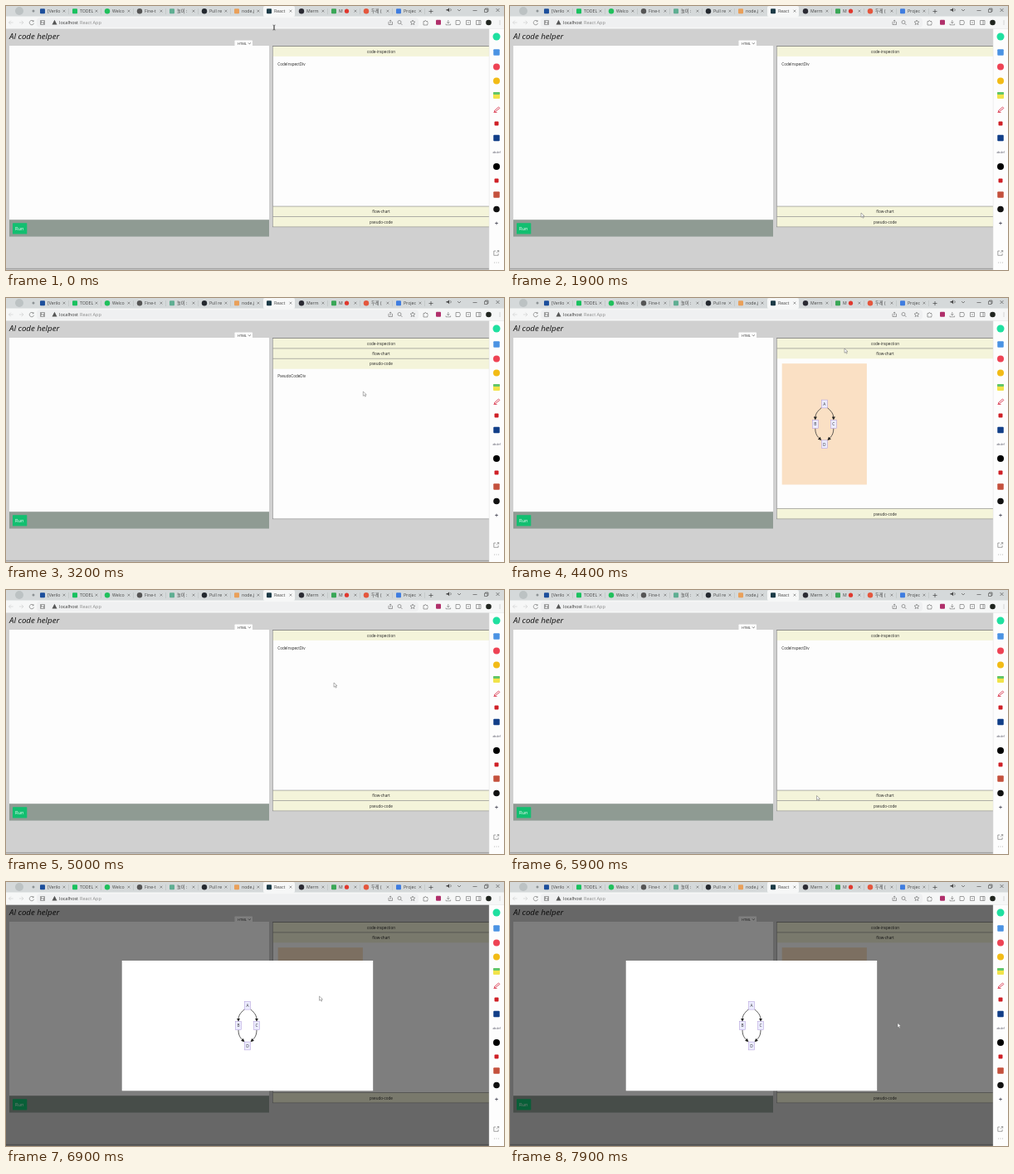
Animation, 600 px wide and 319 px high, one loop 8000 ms. Source, as an HTML page:

```html
<!DOCTYPE html>
<html lang="en">
<head>
<meta charset="utf-8">
<title>AI code helper</title>
<style>
html, body { margin: 0; width: 100%; height: 100%; overflow: hidden; background: #d0d0d0; }
svg { display: block; width: 100vw; height: 100vh; }
text { font-family: "Open Sans", "Noto Sans", "Noto Sans CJK KR", "Noto Sans CJK", sans-serif; white-space: pre; }
</style>
</head>
<body>
<svg id="stage" viewBox="0 0 600 319"></svg>
<script>
const LOOP = 8000;
const PAPER = '#fdfdfd';
const rect = (x, y, w, h, fill, more = '') =>
  `<rect x="${x}" y="${y}" width="${w}" height="${h}" fill="${fill}" ${more}/>`;
const dot = (x, y, r, fill) => `<circle cx="${x}" cy="${y}" r="${r}" fill="${fill}"/>`;
const line = (d, stroke = '#444', width = .8, more = '') =>
  `<path d="${d}" fill="none" stroke="${stroke}" stroke-width="${width}" ${more}/>`;
const text = (x, y, size, str, fill = '#222', more = '') =>
  `<text x="${x}" y="${y}" font-size="${size}" fill="${fill}" ${more}>${str}</text>`;
const square = (x, y, s, fill) => rect(x - s / 2, y - s / 2, s, s, fill, 'rx="1"');

// Browser chrome: tab title, icon colour, square icon or round
const tabs = [
  ['[Verilo', '#1d4f9c', 1], ['TODEL', '#19c15f', 1], ['Welco', '#20c05c', 0], ['Fine-t', '#555', 0],
  ['놀이 :', '#5fae92', 1], ['Pull re', '#24292f', 0], ['node.j', '#e9a05a', 1], ['React', '#1c3b47', 1],
  ['Merm', '#2b2b33', 0], ['M', '#3aa757', 1], ['두레 (', '#e4573d', 0], ['Projec', '#3f7de0', 1]
];

function tabStrip() {
  let out = rect(0, 0, 600, 13, '#d5d9da') + dot(16, 6, 5, '#bcc2c3') + dot(33, 6, 1.5, '#8c9294');
  tabs.forEach(([name, color, boxy], i) => {
    const x = 44 + i * 39;
    if (i === 7) out += rect(x - 7, 0, 38, 13, '#f6f7f7', 'rx="2"');
    else if (i !== 6) out += line(`M${x + 31.5} 3v7`, '#b4babb', .5);
    out += boxy ? square(x, 6.2, 6, color) : dot(x, 6.2, 3.2, color);
    out += text(x + 6, 8.1, 5.2, name, '#444');
    out += line(`M${x + 24.5} 4.700l2.800 2.800m0-2.800l-2.800 2.800`, '#666', .6);
  });
  return out + dot(410.5, 6.2, 2.6, '#e0382e') +
    line('M509.500 6.500h5m-2.500-2.500v5', '#444', .7) +
    '<path d="M530.5 4h1.600l2-1.800v5l-2-1.800h-1.600z" fill="#444"/>' +
    line('M535.500 3.200q1.500 1.500 0 3M544 4l2 2 2-2M562.500 5.500h5M576.500 4h3.500v3.500h-3.500zM577.500 4v-1h3.500v3.500h-1M590.500 3l4 4m0-4l-4 4', '#444', .6);
}

function toolbar() {
  const arrows =
    'M8.500 20h-5m2.300-2.300l-2.300 2.300 2.300 2.300M16 20h5m-2.300-2.300l2.300 2.300-2.300 2.300';
  const icons =
    'M33 18.300a2.700 2.700 0 1 0 .6 2.500m-.4-3.500v1.500h-1.500M41.500 17.500h5v5h-5zM42.500 21.500v-3l3 3v-3' +
    'M461 19v3.500h4.500v-3.500M463.200 21v-4m-1.300 1.300l1.300-1.300 1.300 1.300M475.500 21l2 2' +
    'M490 17l.9 1.900 2 .2-1.500 1.400.4 2-1.800-1-1.800 1 .4-2-1.500-1.400 2-.2z' +
    'M503 18.500h1.500q.7-2.500 1.600 0h1.700v1.500q1.500.7 0 1.500v1.500h-4.800z' +
    'M532.800 17v4m-1.600-1.600l1.600 1.600 1.600-1.600M530 21.500v1.300h5.600v-1.300' +
    'M542 17.500h4.500l1 2.500-1 2.500h-4.500zM554.500 17.500h5v5h-5zM556 20h2M566.500 17.500h5.500v5h-5.500zM570 17.500v5';
  return rect(0, 12.5, 600, 15, '#f6f7f7') +
    rect(37, 14.3, 460, 11.4, '#eff0f1', 'rx="4"') +
    line(arrows, '#ccc', .6) + line(icons, '#666', .6) +
    '<circle cx="474" cy="19.500" r="2" fill="none" stroke="#666" stroke-width=".6"/>' +
    '<path d="M58.500 16.700l3 5.800h-6z" fill="#555"/>' +
    text(64, 22, 5.5, 'localhost', '#333') + text(89, 22, 5.5, 'React App', '#888') +
    square(521, 19.8, 6, '#b0306b') + dot(581.5, 20, 3.3, '#20251f') +
    [18, 20, 22].map(y => dot(595, y, .4, '#666')).join('');
}

function sidebar() {
  const icons = [
    [37, '#1fe0a0', 0, 4.5], [56, '#4b93e3', 1, 7.5], [73.5, '#ee4354', 0, 4], [90.5, '#f2bb16', 0, 4],
    [142, '#cf2026', 1, 5], [159.5, '#123f88', 1, 7.5], [194, '#000', 0, 4], [211, '#cf2026', 1, 5],
    [228, '#c4513d', 1, 7.5], [245.5, '#111', 0, 3.8]
  ];
  return rect(582, 27.5, 18, 291.5, PAPER) + line('M582.200 27.500V319', '#ddd', .5) +
    icons.map(([y, color, boxy, s]) => boxy ? square(591, y, s, color) : dot(591, y, s, color)).join('') +
    rect(587, 104, 8, 8, '#f1e34a', 'rx="1"') + rect(587, 104, 8, 3, '#62c66a', 'rx="1"') +
    line('M588 127l5.500-5 1.300 1.500-5.800 4.500zM587.500 128.500h4', '#dc4358', .9) +
    text(591, 177.6, 2.6, 'abc-def', '#334', 'text-anchor="middle"') +
    line('M589.200 262.500h3.600m-1.800-1.800v3.600', '#445', .8) +
    line('M590 296h-2.200v5.300h5.300v-2.300M591 298.300l2.700-2.700m-2 0h2v2', '#666', .6) +
    [588.5, 591, 593.5].map(x => dot(x, 310, .4, '#666')).join('');
}

// Page
const page = rect(0, 27, 582, 292, '#d0d0d0') +
  rect(0, 316.8, 582, 1.5, '#a2a2a2') +
  text(4, 40.4, 9.7, 'AI code helper', '#111', 'font-style="italic"') +
  rect(4, 48, 313, 210.5, PAPER) + rect(4, 258.3, 313, 20.3, '#8f9b93') +
  rect(8, 262.2, 17.3, 13.3, '#12bf70', 'rx=".6"') + text(11, 271.2, 5.7, 'Run', '#fff') +
  rect(275.5, 41.5, 21.5, 7.3, PAPER, 'rx=".8"') + text(279, 46.8, 4, 'HTML') +
  line('M292 44.500l1.400 1.400 1.400-1.400', '#222', .6);

function chart(x, y) {
  const edge = d => line(d, '#333', .8, 'marker-end="url(#tip)"');
  const edges = [-1, 1].map(s =>
    edge(`M${s * 3.5} 4.500C${s * 9} 9.500 ${s * 11} 12 ${s * 11} 18`) +
    edge(`M${s * 11} 29.500C${s * 11} 36 ${s * 9} 39 ${s * 4.7} 43`)).join('');
  const nodes = [['A', 0, 0], ['B', -11, 24.4], ['C', 11, 24.4], ['D', 0, 48.8]].map(([name, dx, dy]) =>
    rect(dx - 3.5, dy - 4.9, 7, 9.8, '#ececff', 'stroke="#ab96d8" stroke-width=".5"') +
    text(dx, dy + 1.8, 4.8, name, '#333', 'text-anchor="middle"')).join('');
  return `<g transform="translate(${x} ${y})">${edges}${nodes}</g>`;
}

const titles = ['code-inspection', 'flow-chart', 'pseudo-code'];
const bodies = [
  text(327.3, 71.7, 4.6, 'CodeInspectDiv'),
  rect(327.7, 79.2, 102.2, 146.3, '#fae0c4') + chart(378.8, 128),
  text(327.3, 96.4, 4.6, 'PseudoCodeDiv')
];

function panel(open) {
  const left = 321.5, top = 48.5, row = 12.4, body = 181.2, height = 3 * row + body;
  let out = rect(left, top, 262, height, PAPER);
  titles.forEach((title, i) => {
    const y = top + i * row + (i > open ? body : 0);
    out += rect(left, y, 262, row, '#f4f4da') +
      line(`M${left} ${y}h262`, '#666', .5) +
      text(452, y + 8.1, 4.6, title, '#222', 'text-anchor="middle"');
  });
  out += rect(left, top, 262, height, 'none', 'stroke="#777" stroke-width=".5"');
  return `<g class="panel">${out}${bodies[open]}</g>`;
}

const modal = `<g id="modal">${rect(0, 27.5, 582, 291.5, '#000', 'opacity=".5"')}` +
  rect(139.7, 95, 302.5, 157.3, '#fff') + chart(291, 149.2) + '</g>';

const cursors =
  line('M-1.500-3q1.500 0 1.500 1v4q0 1-1.500 1M1.500-3q-1.500 0-1.500 1v4q0 1 1.500 1', '#222', .6, 'id="beam"') +
  '<path id="arrow" d="M0 0v5.300l1.300-1.100 1 2 .9-.4-.9-2h1.700z" fill="#fff" stroke="#666" stroke-width=".5"/>';

const stage = document.getElementById('stage');
stage.innerHTML =
  `<defs><marker id="tip" viewBox="0 0 4 4" refX="2.500" refY="2" markerWidth="4.200" markerHeight="4.200"
    markerUnits="userSpaceOnUse" orient="auto"><path d="M0 0L4 2 0 4z" fill="#222"/></marker></defs>` +
  page + [0, 1, 2].map(panel).join('') + modal + tabStrip() + toolbar() + sidebar() + cursors;

const panels = [...stage.querySelectorAll('.panel')];
const [modalEl, beam, arrow] = ['modal', 'beam', 'arrow'].map(id => document.getElementById(id));
const show = (el, on) => el.style.display = on ? '' : 'none';

// Pointer moves: start, end, x, y; it rests between them
const moves = [
  [0, 200, 345, 70], [400, 600, 400, 170], [700, 900, 424, 254], [1700, 1900, 423, 250],
  [1900, 2100, 426, 247], [2100, 2600, 428, 236], [2600, 2700, 430, 259], [2700, 3000, 432, 152],
  [3100, 3200, 430.3, 113], [3900, 4200, 408, 68], [4200, 4400, 403, 61], [4600, 4800, 401, 56],
  [4800, 5100, 392, 140], [5200, 5300, 384, 185], [5700, 5900, 369.5, 248.5], [5900, 6000, 370, 247],
  [6000, 6300, 380, 160], [6400, 6600, 377.5, 138], [7300, 7400, 430, 160], [7800, 7900, 467, 170.5]
];
// Time of each click and the section it opens
const clicks = [[0, 0], [2100, 1], [2800, 2], [4300, 1], [4900, 0], [6100, 1]];

function pointer(t) {
  let x = 323, y = 26;
  for (const [start, end, toX, toY] of moves) {
    if (t <= start) break;
    const k = Math.min(1, (t - start) / (end - start));
    x += (toX - x) * k;
    y += (toY - y) * k;
  }
  return [x, y];
}

function draw(now) {
  const t = Math.floor(now % LOOP / 100) * 100;
  const open = clicks.filter(([at]) => at <= t).pop()[1];
  const [x, y] = pointer(t);
  panels.forEach((el, i) => show(el, i === open));
  show(modalEl, t >= 6900);
  show(beam, y < 28);
  show(arrow, y >= 28);
  for (const el of [beam, arrow]) el.setAttribute('transform', `translate(${x} ${y})`);
}

const begin = performance.now();
function tick() {
  draw(performance.now() - begin);
  requestAnimationFrame(tick);
}
tick();
</script>
</body>
</html>
```
